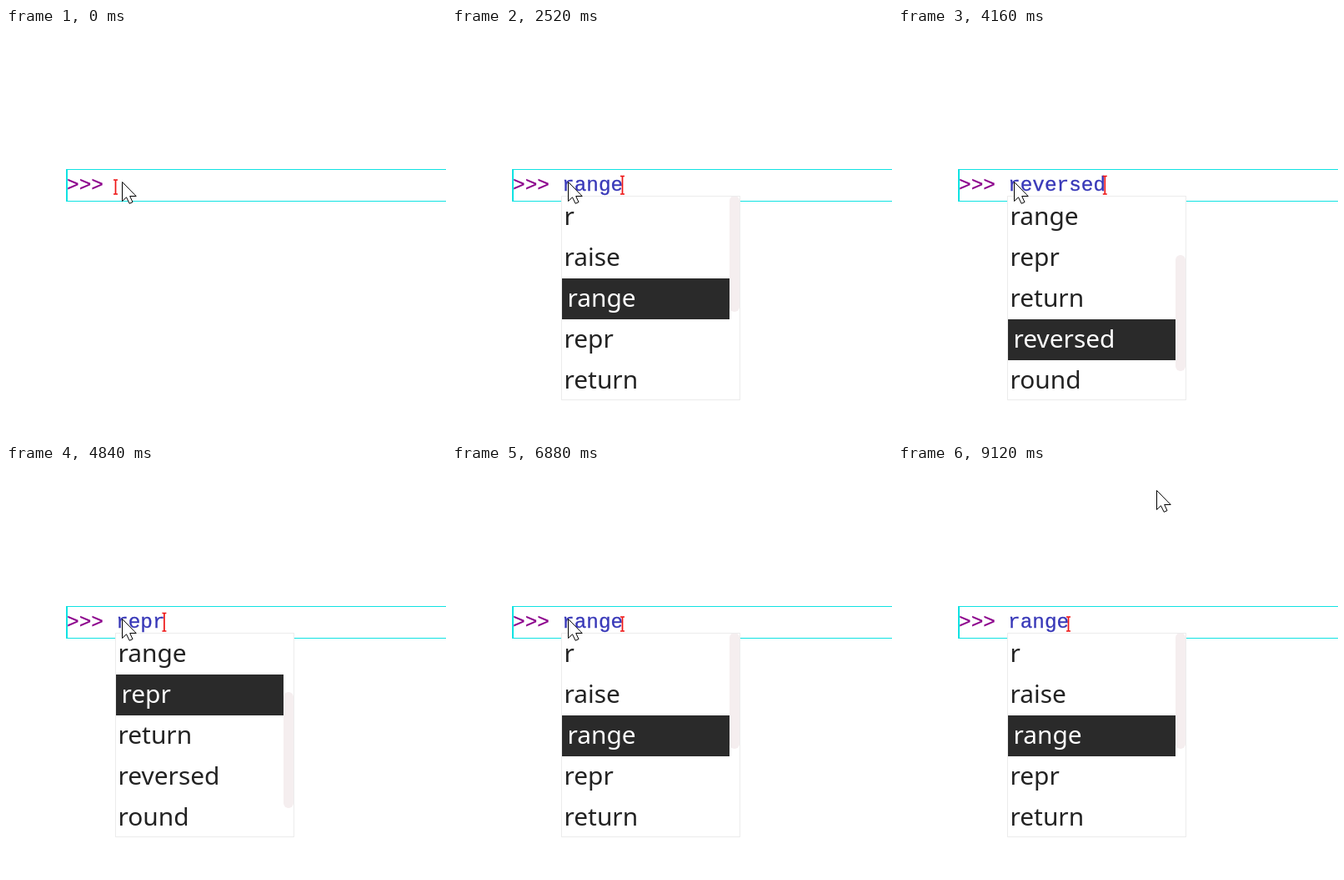
Write an HTML page that moves like this. It is 528 px wide and 490 px high and loops after 9160 ms.

```html
<!DOCTYPE html>
<html lang="en">
<head>
<meta charset="utf-8">
<title>Code completion</title>
<style>
html, body { margin: 0; width: 100%; height: 100%; overflow: hidden; background: #fff; }
#stage { position: relative; width: 528px; height: 490px; overflow: hidden; background: #fff; }
#stage > * { position: absolute; }
svg { left: 0; top: 0; overflow: visible; }
#field { left: 72px; top: 169px; width: 470px; height: 37px; border: 1px solid #10e2e2; border-left-width: 2px; }
.code { top: 174px; font: 24.4px/30px "Liberation Mono", monospace; white-space: pre; -webkit-text-stroke: .3px; }
#prompt { left: 73px; color: #8b008b; }
#word { left: 132px; }
#caret { fill: none; stroke: #ee1515; stroke-width: 1.7; }
#popup { left: 131px; top: 201px; width: 213px; height: 243px; border: 1px solid #ececec; background: #fff; overflow: hidden; }
#view { position: absolute; width: 201px; height: 245px; overflow: hidden; }
.row { height: 49px; box-sizing: border-box; padding-left: 2.5px; font: 29.9px/46px "Noto Sans", "Open Sans", sans-serif; color: #222; }
.row.on { padding-left: 6.5px; background: #2a2a2a; color: #fff; }
#thumb { position: absolute; left: 201px; top: -1px; width: 12px; height: 139px; border-radius: 6px; }
</style>
</head>
<body>
<div id="stage">
  <div id="field"></div>
  <div class="code" id="prompt">&gt;&gt;&gt;</div>
  <div class="code" id="word"></div>
  <svg width="528" height="490"><path id="caret"/></svg>
  <div id="popup"><div id="view"><div id="list"></div></div><div id="thumb"></div></div>
  <svg width="528" height="490">
    <path id="mouse" d="M.5 .5V23.5L5.5 18.8L9.2 26.3L13 24.6L9.7 17.5H17.2Z" fill="#fff" stroke="#000"/>
  </svg>
</div>
<script>
const LOOP = 9160, CELL = 14.6, ROW = 49;
const words = ["r", "raise", "range", "repr", "return", "reversed", "round"];
const keywords = ["raise", "return"];
// [time, selected word, first visible row]
const steps = [
  [1200, 0, 0], [2040, 1, 0], [2440, 2, 0], [2800, 3, 0], [3300, 4, 0],
  [3560, 5, 1], [3800, 6, 2], [4080, 5, 2], [4640, 4, 2], [4820, 3, 2],
  [5000, 2, 2], [5200, 1, 1], [5360, 0, 0], [5520, 1, 0], [5900, 2, 0]
];
const $ = id => document.getElementById(id);
const rows = words.map(text => {
  const row = document.createElement("div");
  row.className = "row";
  row.textContent = text;
  return $("list").appendChild(row);
});

function colorOf(word) {
  if (word === "r") return "#000070";
  return keywords.includes(word) ? "#2f8a8a" : "#3838b8";
}

function drawCaret(length, tall) {
  const x = 131.5 + CELL * length, top = tall ? 177.5 : 182;
  $("caret").setAttribute("d", `M${x - 2.5} ${top}h5M${x - 2.5} 199h5M${x} ${top}V199`);
}

function drawMouse(t) {
  const p = Math.min(1, Math.max(0, (t - 8320) / 720));
  const k = p * p * (3 - 2 * p);
  $("mouse").setAttribute("transform", `translate(${139 + 171 * k} ${184 - 154 * k})`);
}

let shown = null;
function showStep(step) {
  if (step === shown) return;
  shown = step;
  $("popup").style.display = step ? "block" : "none";
  $("word").textContent = step ? words[step[1]] : "";
  if (!step) return;
  const [, index, first] = step, word = words[index];
  const builtin = word !== "r" && !keywords.includes(word);
  $("word").style.color = colorOf(word);
  rows.forEach((row, i) => row.classList.toggle("on", i === index));
  $("list").style.transform = `translateY(${-ROW * first}px)`;
  $("thumb").style.transform = `translateY(${35.5 * first}px)`;
  $("thumb").style.background = builtin ? "#f5eeef" : "#e6eee6";
}

const start = performance.now();
function frame(now) {
  const t = Math.max(0, now - start) % LOOP;
  const step = steps.filter(s => s[0] <= t).pop();
  showStep(step);
  drawCaret(step ? words[step[1]].length : 0, step && t - step[0] < 120);
  drawMouse(t);
  requestAnimationFrame(frame);
}
frame(start);
</script>
</body>
</html>
```
